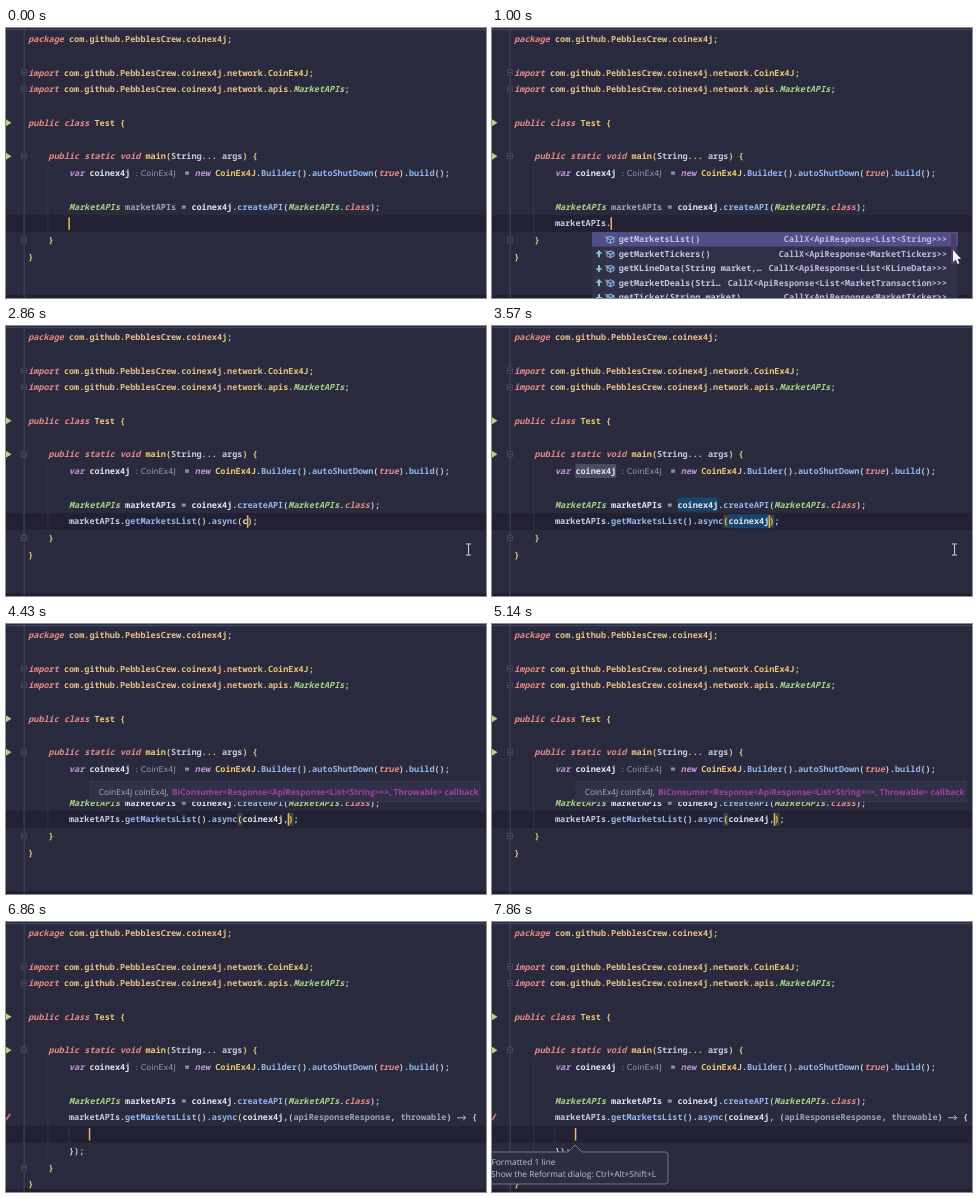
An HTML page with a canvas that plays this animation: 480 px wide and 270 px high, repeating every 8 s.

```html
<!DOCTYPE html>
<html lang="en">
<head>
<meta charset="utf-8">
<title>Code completion</title>
<style>
html, body { margin: 0; width: 100%; height: 100%; overflow: hidden; background: #292a3d; }
canvas { display: block; width: 100%; height: 100%; }
</style>
</head>
<body>
<canvas id="stage"></canvas>
<script>
const canvas = document.getElementById('stage');
const ctx = canvas.getContext('2d');
const W = 480, H = 270, LOOP = 8000, FPS = 7;
const CHAR = 5.1, LEFT = 22.2, ROW = 16.75;
const MONO = '"Noto Sans Mono", "DejaVu Sans Mono", monospace';
const SANS = '"Open Sans", "Noto Sans", sans-serif';

const COLORS = {
  k: '#e88a88', n: '#c792e0', o: '#e8c08a', c: '#efc878', i: '#a9d488', m: '#94b6ec',
  v: '#e3e4ee', p: '#c4cae0', a: '#f0a070', g: '#a0a2bc', b: '#e2cf78'
};
const ITALIC = 'kni';

const rowY = n => 11 + n * ROW;
const colX = n => LEFT + n * CHAR;

function rect(x, y, w, h, color) {
  ctx.fillStyle = color;
  ctx.fillRect(x, y, w, h);
}

function outline(x, y, w, h, color, width) {
  ctx.strokeStyle = color;
  ctx.lineWidth = width;
  ctx.strokeRect(x, y, w, h);
}

function stroke(color, width, ...points) {
  ctx.strokeStyle = color;
  ctx.lineWidth = width;
  ctx.beginPath();
  points.forEach(([x, y], i) => i ? ctx.lineTo(x, y) : ctx.moveTo(x, y));
  ctx.stroke();
}

function polygon(color, ...points) {
  ctx.fillStyle = color;
  ctx.beginPath();
  points.forEach(([x, y]) => ctx.lineTo(x, y));
  ctx.fill();
}

function text(str, x, y, color, font) {
  ctx.font = font;
  ctx.fillStyle = color;
  ctx.fillText(str, x, y + 3);
}

// Draws style/text pairs on the character grid and returns the end x.
function code(tokens, x, y, limit = Infinity) {
  for (let i = 0; i < tokens.length && limit > 0; i += 2) {
    const style = tokens[i], str = tokens[i + 1].slice(0, limit);
    if (str === '->') {
      stroke(COLORS.p, 0.9, [x + 0.5, y + 0.5], [x + 9, y + 0.5]);
      stroke(COLORS.p, 0.9, [x + 6.5, y - 2], [x + 9, y + 0.5], [x + 6.5, y + 3]);
    } else {
      text(str, x, y, COLORS[style], `${ITALIC.includes(style) ? 'italic ' : ''}600 8.5px ${MONO}`);
    }
    x += str.length * CHAR;
    limit -= str.length;
  }
  return x;
}

const PACKAGE = 'com.github.PebblesCrew.coinex4j';
const HEADER = [
  [0, 0, ['k', 'package ', 'o', PACKAGE, 'p', ';']],
  [2, 0, ['k', 'import ', 'o', PACKAGE + '.network.', 'c', 'CoinEx4J', 'p', ';']],
  [3, 0, ['k', 'import ', 'o', PACKAGE + '.network.apis.', 'i', 'MarketAPIs', 'p', ';']],
  [5, 0, ['k', 'public class ', 'c', 'Test {']],
  [7, 4, ['k', 'public static void ', 'c', 'main', 'b', '(', 'p', 'String', 'c', '... ', 'p', 'args', 'b', ') {']],
  [8, 8, ['n', 'var ', 'v', 'coinex4j']]
];
const BUILDER = ['p', '= ', 'n', 'new ', 'c', 'CoinEx4J', 'p', '.', 'm', 'Builder', 'p', '().',
  'm', 'autoShutDown', 'p', '(', 'k', 'true', 'p', ').', 'm', 'build', 'p', '();'];
const createLine = used => ['i', 'MarketAPIs ', used ? 'v' : 'g', 'marketAPIs', 'p', ' = ', 'v', 'coinex4j',
  'p', '.', 'm', 'createAPI', 'p', '(', 'i', 'MarketAPIs', 'p', '.', 'k', 'class', 'p', ');'];
const callLine = gap => ['p', 'marketAPIs.', 'm', 'getMarketsList', 'p', '().', 'm', 'async', 'b', '(',
  'v', 'coinex4j', 'p', ',' + gap + '(', 'g', 'apiResponseResponse', 'p', ', ', 'g', 'throwable',
  'p', ') ', 'v', '->', 'p', ' ', 'p', '{'];

// [step, characters typed on the call line]
const TYPING = [[0, 0], [1, 1], [2, 2], [3, 3], [4, 5], [5, 10], [6, 11], [11, 27], [12, 28], [14, 29],
  [15, 30], [18, 34], [20, 35], [21, 37], [22, 39], [23, 41], [24, 42], [28, 43], [37, 79], [44, 80]];

const MARKET_ROWS = [
  [0, 'getMarketsList()', 'CallX<ApiResponse<List<String>>>'],
  [1, 'getMarketTickers()', 'CallX<ApiResponse<MarketTickers>>'],
  [-1, 'getKLineData(String market,…', 'CallX<ApiResponse<List<KLineData>>>'],
  [1, 'getMarketDeals(Stri…', 'CallX<ApiResponse<List<MarketTransaction>>>'],
  [-1, 'getTicker(String market)', 'CallX<ApiResponse<MarketTicker>>']
];
const ASYNC_ROWS = [
  [0, 'async(CoinEx4J coinEx4J, BiConsumer<Response<ApiResponse', ''],
  [1, 'asyncBody(CoinEx4J coinEx4J, BiConsumer<ApiResponse<List', ''],
  [-1, 'asyncCall(CoinEx4J coinEx4J, BiConsumer<Call<ApiResponse', ''],
  [0, 'hashCode()', ''],
  [0, 'getClass()', 'Class<?>']
];

function cube(x, y) {
  polygon('#8fb4dc', [x, y - 4], [x + 4, y - 2], [x + 4, y + 2], [x, y + 4], [x - 4, y + 2], [x - 4, y - 2]);
  polygon('#34406a', [x, y - 2.8], [x + 2.4, y - 1.6], [x, y - 0.5], [x - 2.4, y - 1.6]);
  polygon('#34406a', [x - 3, y - 0.7], [x - 0.6, y + 0.5], [x - 0.6, y + 2.7], [x - 3, y + 1.5]);
  polygon('#34406a', [x + 3, y - 0.7], [x + 0.6, y + 0.5], [x + 0.6, y + 2.7], [x + 3, y + 1.5]);
}

function popup(x, right, rows, match, rightEdge) {
  rect(x, 204, right - x, 66, '#303149');
  rect(x, 204, right - x, 14.5, '#514f88');
  rows.forEach(([rank, label, type], n) => {
    const y = 211.3 + n * 14.45, textX = x + 26.7;
    if (rank) {
      const ax = x + 7, tip = y - rank * 3.5;
      polygon('#8cc9b8', [ax, tip], [ax + 3.5, tip + rank * 3.5], [ax - 3.5, tip + rank * 3.5]);
      rect(ax - 1, y - 3, 2, 6.5, '#8cc9b8');
    }
    stroke('#a5a7c4', 0.8, [x + 12.5, y - 2.5], [x + 15.5, y - 2.5], [x + 14, y - 0.5]);
    cube(x + 18.5, y + 0.5);
    text(label, textX, y, '#c4c8e2', `600 8.5px ${MONO}`);
    const at = match ? label.indexOf(match) : -1;
    if (at >= 0) text(match, textX + at * CHAR, y, '#e05cc0', `600 8.5px ${MONO}`);
    text(type, rightEdge - type.length * CHAR, y, '#c3b8e0', `600 8.5px ${MONO}`);
  });
  if (right < W) rect(459, 205, 5, 31, '#4d3b68');
}

function parameterHint(x, textX) {
  rect(x, 157.5, 390, 20, '#303047');
  outline(x, 157.5, 390, 20, '#3a3a54', 0.8);
  const y = 168;
  text('CoinEx4J coinEx4J,', textX, y, '#a9abc0', `8.35px ${SANS}`);
  text('BiConsumer<Response<ApiResponse<List<String>>>, Throwable> callback',
    textX + 73.3, y, '#a53fa8', `bold 8.37px ${SANS}`);
}

function reformatTip() {
  ctx.beginPath();
  ctx.moveTo(-5, 230);
  ctx.lineTo(76, 230);
  ctx.lineTo(83, 223);
  ctx.lineTo(90, 230);
  ctx.arcTo(176, 230, 176, 262, 3);
  ctx.arcTo(176, 262, -5, 262, 3);
  ctx.lineTo(-5, 262);
  ctx.closePath();
  ctx.fillStyle = '#2c2d40';
  ctx.fill();
  ctx.strokeStyle = '#73758a';
  ctx.lineWidth = 1;
  ctx.stroke();
  text('Formatted 1 line', -0.5, 240, '#c0c2d0', `8.35px ${SANS}`);
  text('Show the Reformat dialog: Ctrl+Alt+Shift+L', -1, 252, '#c0c2d0', `8.35px ${SANS}`);
}

function foldMark(y) {
  rect(15, y - 3, 6, 6, '#292a3d');
  outline(15.5, y - 2.5, 5, 5, '#4a4c62', 0.8);
  stroke('#666880', 0.8, [16.5, y], [19.5, y]);
}

function pointer(arrow) {
  if (arrow) {
    polygon('#f4f4f8', [461, 222], [461, 234], [463.7, 231.6], [465.6, 236], [467.4, 235.2], [465.6, 231], [469, 230.8]);
    return;
  }
  stroke('#d8d9e2', 1, [462.5, 218.5], [462.5, 228.5]);
  stroke('#d8d9e2', 1, [460, 218], [465, 218]);
  stroke('#d8d9e2', 1, [460, 229], [465, 229]);
}

function draw(step) {
  const block = step >= 47, formatted = step >= 50;
  const typed = TYPING.filter(([start]) => start <= step).pop()[1];
  const caretRow = block ? 12 : 11;
  const between = (from, to) => step >= from && step < to;

  rect(0, 0, W, H, '#292a3d');
  rect(0, 1, W, 1.2, '#3d4767');
  rect(0, rowY(caretRow) - 8, W, ROW, '#222133');
  rect(0, 267, W, 3, '#202130');
  rect(17.7, 0, 0.8, H, '#4d4f63');
  rect(41.5, 137, 0.8, block ? 101 : 68, '#36384c');
  if (block) rect(62.5, 204, 0.8, 17, '#36384c');

  [2, 3, 7, block ? 14 : 12].forEach(n => foldMark(rowY(n)));
  [5, 7].forEach(n => polygon('#b4d488', [0, rowY(n) - 3.5], [5.5, rowY(n)], [0, rowY(n) + 3.5]));
  if (block) stroke('#d66a78', 1.8, [0, 198], [4, 192]);

  if (between(24, 28)) {
    rect(colX(12), rowY(8) - 7, 8 * CHAR, 14, '#4a4c5f');
    rect(colX(32), rowY(10) - 7, 8 * CHAR, 14, '#19466b');
    rect(colX(42), rowY(11) - 7, 8 * CHAR, 14, '#19466b');
  }

  HEADER.forEach(([n, col, tokens]) => code(tokens, colX(col), rowY(n)));
  text(': CoinEx4J', 129.5, rowY(8) - 0.5, '#9698ae', '8px "DejaVu Sans", sans-serif');
  code(BUILDER, 178.6, rowY(8));
  code(createLine(step >= 8), colX(8), rowY(10));

  let caretX = code(callLine(formatted ? ' ' : ''), colX(8), rowY(11), block ? Infinity : typed);
  if (block) {
    caretX = colX(12);
    code(['p', '});'], colX(8), rowY(13));
  } else if (typed >= 34) {
    if (typed >= 42 && typed < 80) {
      rect(colX(41), rowY(11) - 6.5, CHAR, 13, '#3c4444');
      rect(caretX, rowY(11) - 6.5, CHAR, 13, '#3c4444');
      code(['b', '('], colX(41), rowY(11));
    }
    code(typed >= 80 ? ['p', '});'] : ['b', ')', 'p', ';'], caretX, rowY(11));
  }
  code(['b', '}'], colX(4), rowY(block ? 14 : 12));
  code(['c', '}'], colX(0), rowY(block ? 15 : 13));
  rect(caretX - 0.6, rowY(caretRow) - 6, 1.5, 12.5, '#f0b84c');

  const marketList = between(7, 11), asyncList = between(13, 18);
  if (marketList) popup(100, 466, MARKET_ROWS, '', 455);
  if (asyncList) popup(187, W, ASYNC_ROWS, 'as', 481);
  if (between(29, 37)) parameterHint(84, 92.7);
  if (between(37, 45)) parameterHint(100, 108);
  if (step >= 51) reformatTip();
  if (between(7, 28) || between(38, 46)) pointer(marketList || asyncList);
}

function frame(now) {
  const ratio = window.devicePixelRatio || 1;
  const width = Math.round(innerWidth * ratio), height = Math.round(innerHeight * ratio);
  if (canvas.width !== width || canvas.height !== height) {
    canvas.width = width;
    canvas.height = height;
  }
  ctx.setTransform(width / W, 0, 0, height / H, 0, 0);
  ctx.textRendering = 'geometricPrecision';
  draw(Math.floor((now % LOOP) * FPS / 1000 + 0.05));
  requestAnimationFrame(frame);
}
requestAnimationFrame(frame);
</script>
</body>
</html>
```
